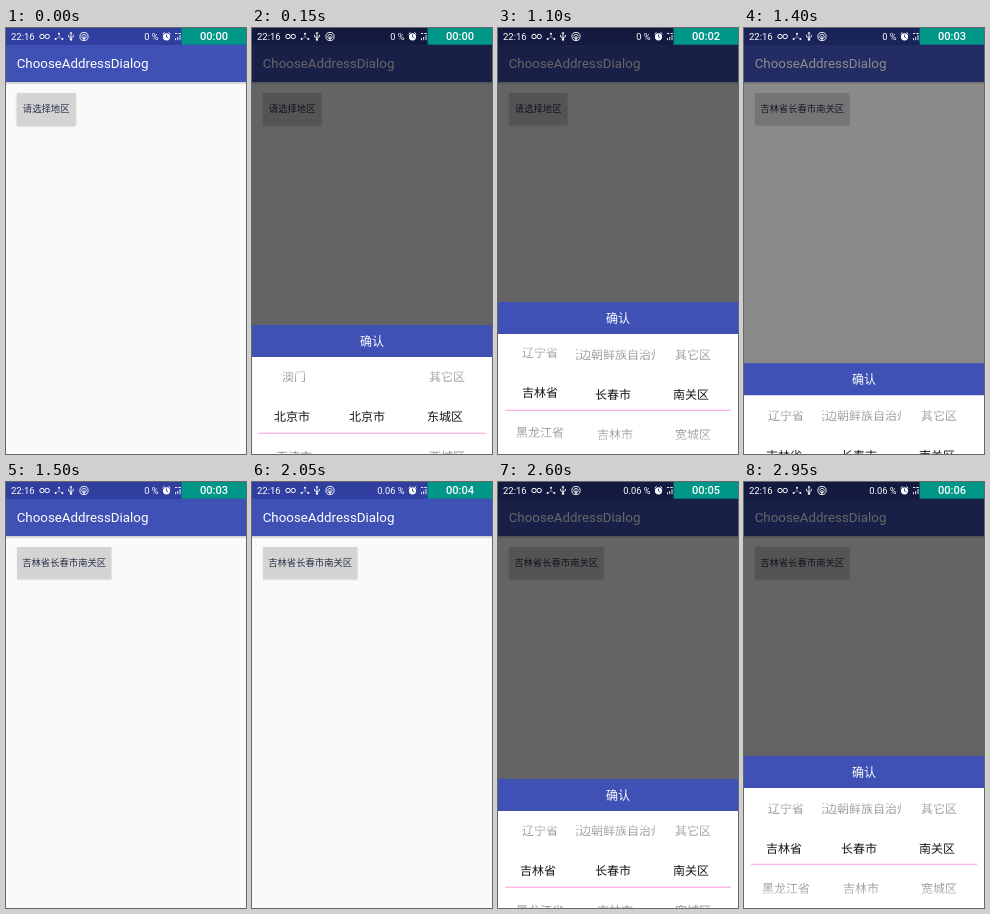
An HTML page for the animation above (3150 ms loop, 240 px wide and 426 px high).

```html
<!DOCTYPE html>
<html lang="zh-CN">
<head>
<meta charset="utf-8">
<style>
  html, body { margin: 0; width: 100%; height: 100%; overflow: hidden; background: #fafafa; }
  svg { display: block; width: 100vw; height: 100vh; }
  text { font-family: Roboto, sans-serif; fill: #fff; }
  .cjk { font-family: "Noto Sans CJK SC", "Noto Sans CJK", sans-serif; }
  .wheel text { font-size: 12px; text-anchor: middle; fill: #161616; }
</style>
</head>
<body>
<svg viewBox="0 0 240 426">
  <defs>
    <linearGradient id="barShadow" x2="0" y2="1">
      <stop stop-opacity=".2"/><stop offset="1" stop-opacity="0"/>
    </linearGradient>
    <linearGradient id="fade" x2="0" y2="1">
      <stop stop-color="#fff"/>
      <stop offset=".44" stop-color="#fff" stop-opacity="0"/>
      <stop offset=".56" stop-color="#fff" stop-opacity="0"/>
      <stop offset="1" stop-color="#fff"/>
    </linearGradient>
    <filter id="soft" x="-20%" y="-30%" width="140%" height="170%"><feGaussianBlur stdDeviation=".9"/></filter>
  </defs>

  <rect width="240" height="426" fill="#fafafa"/>
  <rect y="54" width="240" height="3" fill="url(#barShadow)"/>
  <rect width="240" height="54" fill="#3f51b5"/>
  <rect width="240" height="17" fill="#303f9f"/>
  <text x="10.7" y="40" font-size="13.33">ChooseAddressDialog</text>

  <rect id="shadow" x="11" y="66" height="32" filter="url(#soft)"/>
  <rect id="button" x="11" y="65" height="32.5" fill="#d4d4d4"/>
  <text id="label" class="cjk" y="84" font-size="9.33" text-anchor="middle" style="fill:#2b3148"></text>

  <rect id="scrim" width="240" height="426"/>

  <g id="dialog">
    <rect y="306" width="240" height="120" fill="#fff"/>
    <g id="wheels" class="wheel cjk"></g>
    <rect y="306" width="240" height="120" fill="url(#fade)"/>
    <rect x="7" y="381.7" width="226" height="1.2" fill="#f9aee6"/>
    <rect y="274" width="240" height="32" fill="#3f51b5"/>
    <text class="cjk" x="120" y="294.6" font-size="12" text-anchor="middle">确认</text>
  </g>

  <g fill="none" stroke="#fff">
    <text x="5" y="12" font-size="9.5" stroke="none">22:16</text>
    <text id="load" x="152.5" y="12" font-size="9.3" text-anchor="end" stroke="none"></text>
    <circle cx="36" cy="8.5" r="2.2"/><circle cx="41.2" cy="8.5" r="2.2"/>
    <path d="M53 6v3l-3.5 2M53 9l3.5 2" stroke-width=".4"/>
    <path d="M53 5.8h.01M49.6 11h.01M56.4 11h.01" stroke-width="2" stroke-linecap="round"/>
    <path d="M65 4.5v7.5M62.6 6.8v2l2.4 1.4 2.4-1.6V6.8" stroke-width=".9"/>
    <path d="M63.6 5.6 65 3.8l1.4 1.8z" fill="#fff" stroke="none"/>
    <circle cx="65" cy="11.6" r="1.2" fill="#fff" stroke="none"/>
    <circle cx="78" cy="8.5" r="4.1" stroke-width=".9"/>
    <circle cx="78" cy="8.5" r="2.2" stroke-width=".8"/>
    <path d="M78 8.3v3.6" stroke-width="1.2"/>
    <circle cx="160.5" cy="8.8" r="3.6" fill="#fff" stroke="none"/>
    <path d="M156.7 6.1l1.8-1.7M164.3 6.1l-1.8-1.7"/>
    <path d="M160.5 6.6v2.4l1.7 1" stroke="#303f9f" stroke-width=".9"/>
    <path d="M169.5 12.2v-2M171.7 12.2V9M174 12.2V7M169 5.5h2.2M172.3 5.5h2.5" stroke-width=".9"/>
  </g>
  <rect x="175.6" width="64.4" height="16.7" fill="#009688"/>
  <text id="timer" x="208" y="12.1" font-size="11.1" font-weight="500" text-anchor="middle"></text>
</svg>
<script>
const LOOP = 3150, STEP = 50, ROW = 40, MIDDLE = 370.5;
const $ = id => document.getElementById(id);

// province; cities and districts as previous, selected, next
const regions = [
  ['北京市', ',北京市,', '其它区,东城区,西城区'],
  ['天津市', ',天津市,', '其它区,和平区,河东区'],
  ['河北省', '衡水市,石家庄市,唐山市', '其它区,长安区,桥东区'],
  ['山西省', '吕梁市,太原市,大同市', '其它区,小店区,迎泽区'],
  ['内蒙古自治区', '阿拉善盟,呼和浩特市,包头市', '其它区,新城区,回民区'],
  ['辽宁省', '葫芦岛市,沈阳市,大连市', '其它区,和平区,沈河区'],
  ['吉林省', '延边朝鲜族自治州,长春市,吉林市', '其它区,南关区,宽城区'],
  ['黑龙江省', '大庆市,哈尔滨市,齐齐哈尔市', '其它区,道里区,南岗区']
];

const scrollKeys = [[400, 0], [500, 2.4], [600, 4.55], [700, 5.65], [800, 6.2],
  [900, 6.4], [1000, 6.18], [1100, 6.05], [1200, 6]];
const dimKeys = [[0, 0], [50, .22], [100, .47], [150, .6], [1350, .6], [1400, .45],
  [1450, .2], [1500, 0], [2450, 0], [2500, .22], [2550, .47], [2600, .6]];
const slideKeys = [[50, 1], [100, .5], [150, .15], [200, 0], [1350, 0], [1400, .4],
  [1450, 1], [2500, 1], [2550, .5], [2600, .15], [2650, 0]];
const liftKeys = [[0, .25], [50, .25], [200, .06], [2200, .06], [2300, .2], [2400, .2], [2500, .06]];

function track(keys, t) {
  const i = keys.findIndex(k => k[0] > t);
  if (i < 0) return keys[keys.length - 1][1];
  if (i === 0) return keys[0][1];
  const [t0, a] = keys[i - 1], [t1, b] = keys[i];
  return a + (b - a) * (t - t0) / (t1 - t0);
}

function make(parent, tag, attrs) {
  const node = document.createElementNS('http://www.w3.org/2000/svg', tag);
  for (const name in attrs) node.setAttribute(name, attrs[name]);
  return parent.appendChild(node);
}

const columns = [[42, 2], [117, 78], [195, 156]].map(([center, left], i) => {
  const clip = make(document.querySelector('defs'), 'clipPath', { id: 'column' + i });
  make(clip, 'rect', { x: left, y: 306, width: 79, height: 120 });
  const group = make($('wheels'), 'g', { 'clip-path': `url(#column${i})` });
  return { center, rows: [-2, -1, 0, 1, 2].map(() => make(group, 'text', {})) };
});

function drawColumn({ center, rows }, position, nameAt) {
  const base = Math.round(position);
  const settled = Math.abs(position - base) < .01;
  rows.forEach((row, i) => {
    const index = base + i - 2;
    row.textContent = nameAt(index) || '';
    row.setAttribute('x', settled && i === 2 ? center - 2 : center);
    row.setAttribute('y', MIDDLE + (index - position) * ROW);
  });
}

function render(t) {
  const chosen = t >= 1400;
  const width = chosen ? 94.5 : 58.5;
  $('button').setAttribute('width', width);
  $('shadow').setAttribute('width', width);
  $('shadow').setAttribute('opacity', track(liftKeys, t));
  $('label').textContent = chosen ? '吉林省长春市南关区' : '请选择地区';
  $('label').setAttribute('x', 10.9 + width / 2);

  $('scrim').setAttribute('opacity', track(dimKeys, t));
  $('dialog').setAttribute('transform', `translate(0 ${track(slideKeys, t) * 153})`);

  const position = track(scrollKeys, t);
  const region = regions[Math.floor(position + .3)];
  drawColumn(columns[0], position, i => i < 0 ? '澳门' : regions[i] && regions[i][0]);
  [1, 2].forEach(c => drawColumn(columns[c], 0, i => region[c].split(',')[i + 1]));

  $('load').textContent = t < 2000 ? '0 %' : '0.06 %';
  $('timer').textContent = '00:0' + Math.floor((t + 100) / 500);
}

const start = performance.now();
function tick() {
  const t = Math.max(0, performance.now() - start) % LOOP;
  render(Math.floor(t / STEP) * STEP);
  requestAnimationFrame(tick);
}
tick();
</script>
</body>
</html>
```
